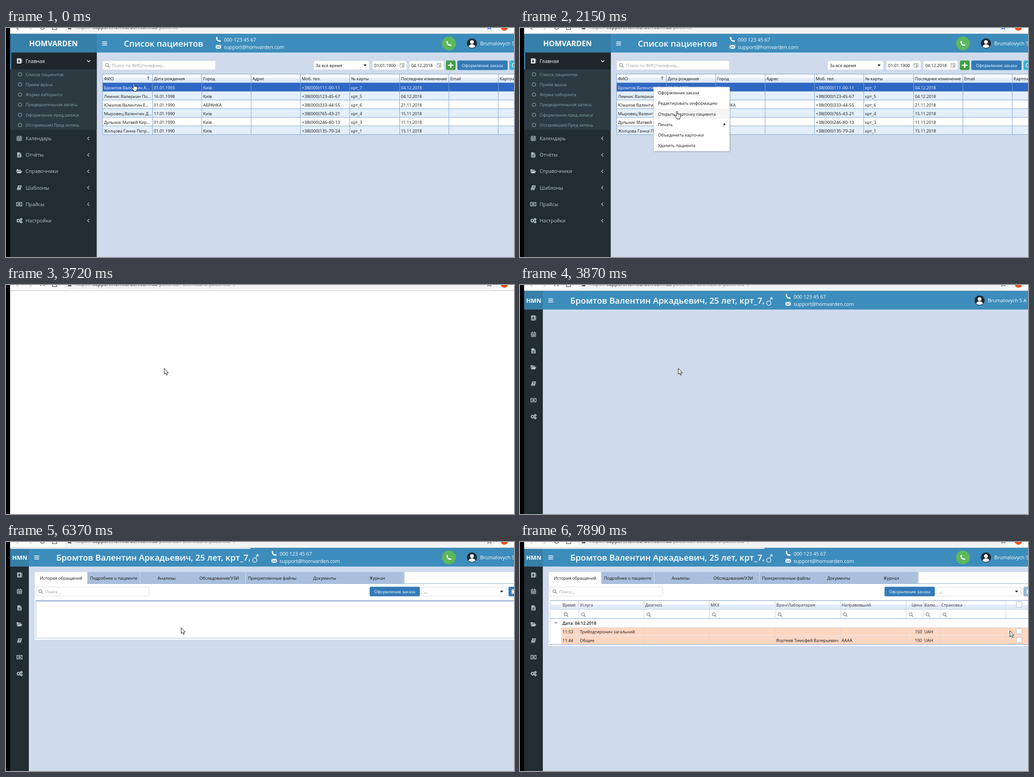
Animation of 1112x504 px, one loop 8 s. Source, as an HTML page:

```html
<!DOCTYPE html>
<html lang="ru">
<head>
<meta charset="utf-8">
<title>Список пациентов</title>
<style>
html, body { margin: 0; width: 100%; height: 100%; overflow: hidden; background: #000; }
svg { display: block; width: 1112px; height: 504px; font-family: 'Open Sans', 'Noto Sans', sans-serif; }
text { white-space: pre; }
</style>
</head>
<body>
<svg id="stage" viewBox="0 0 1112 504"></svg>
<script>
const LOOP = 8000;
const BRAND = 'HOMVARDEN', SHORT = 'HMN', PHONE = '000 123 45 67', MAIL = 'support@homvarden.com';
const USER = 'Brumalovych S A', PATIENT = 'Бромтов Валентин Аркадьевич';
const BLUE = '#337ab7', PAGE = '#cfdbec', GRID = '#7fa3cb';

// Drawing helpers
const rect = (x, y, w, h, fill, more = '') =>
  `<rect x="${x}" y="${y}" width="${w}" height="${h}" fill="${fill}" ${more}/>`;
const text = (x, y, s, size = 9.2, fill = '#111', more = '') =>
  `<text x="${x}" y="${y}" font-size="${size}" fill="${fill}" ${more}>${s}</text>`;
const path = (d, stroke, width = 1, more = '') =>
  `<path d="${d}" fill="none" stroke="${stroke}" stroke-width="${width}" ${more}/>`;
const disc = (x, y, r, fill, more = '') => `<circle cx="${x}" cy="${y}" r="${r}" fill="${fill}" ${more}/>`;
const hline = (x, y, w, fill) => rect(x, y, w, 1, fill);
const vline = (x, y, h, fill) => rect(x, y, 1, h, fill);
const put = (x, y, s) => `<g transform="translate(${x} ${y})">${s}</g>`;
const each = (list, f) => list.map(f).join('');
const field = (x, y, w, h = 20) => rect(x + .5, y + .5, w, h, '#fff', 'stroke="#d3dae3" rx="2"');
const caret = (x, y) => put(x, y, '<path d="M-3.5-1.7H3.5L0 2Z" fill="#111"/>');
const lens = (x, y) => put(x, y, path('M2 2L4.6 4.8', '#888', 1.5) + disc(-.8, -.8, 3.3, 'none', 'stroke="#888" stroke-width="1.2"'));
const SEMI = 'font-weight="600" ', BOLD = 'font-weight="700" ', MID = 'text-anchor="middle"', END = 'text-anchor="end"';

// Icons are centred on 0,0
const solid = d => c => `<path d="${d}" fill="${c}" fill-rule="evenodd"/>`;
const icons = {
  contacts: solid('M-5-5.5H4V5.5H-5ZM4.6-4H6V-1.8H4.6ZM4.6-1H6V1.2H4.6ZM4.6 2H6V4H4.6ZM-.5-3.2A1.8 1.8 0 0 0-.5.4 1.8 1.8 0 0 0-.5-3.2ZM-3.3 3H2.3Q2.2.8 1 .7H-2Q-3.2.8-3.3 3Z'),
  calendar: c => path('M-5-4H5V5H-5ZM-5-1.3H5M-5 1.8H5M-2.4-1.3V5M0-1.3V5M2.4-1.3V5', c) + path('M-2.5-6V-3M2.5-6V-3', c, 1.6),
  file: solid('M-4.5-5.5H1V-2H4.5V5.5H-4.5ZM1.7-5.5L4.5-2.7H1.7ZM-2.5-.5V.5H2.5V-.5ZM-2.5 1.4V2.3H2.5V1.4ZM-2.5 3.2V4.1H2.5V3.2Z'),
  folder: solid('M-6 3V-4.5H-2.5L-1.5-3.3H3.5V-1.5H-3ZM-5.6 4.3L-2.7-.7H6.4L3.6 4.3Z'),
  book: solid('M-2.5-5H5.5L2.8 4.8H-4.5Q-5.8 4.3-5.2 3ZM-1.3-3.2L-1.6-2.2H3.2L3.5-3.2ZM-2-1L-2.3 0H2.5L2.8-1ZM-4 2.8L-4.3 3.7H2L2.3 2.8Z'),
  money: c => rect(-5.8, -3.8, 11.6, 7.6, 'none', `stroke="${c}" stroke-width="1.3"`) + disc(0, 0, 2.5, c) +
    path('M0-1.5V1.5', '#222d32') + path('M-5-2.5H-3.6M5-2.5H3.6M-5 2.5H-3.6M5 2.5H3.6', c),
  cogs: c => each([[-2, 0, 2.6], [4, -3, 1.4], [4, 3, 1.4]], ([x, y, r]) =>
    disc(x, y, r, 'none', `stroke="${c}" stroke-width="1.6"`) +
    disc(x, y, r + 1.1, 'none', `stroke="${c}" stroke-width="1.2" stroke-dasharray="1.4 1.4"`)),
  phone: solid('M-5.5-4Q-4.6-5.8-3-5.5L-1.6-2.3-2.8-1Q-1.4 1.6 1 2.6L2.3 1.4 5.5 3Q5.5 4.7 4 5.5Q-5 5-5.5-4Z'),
  mail: solid('M-6-4.3H6L0 .4ZM-6-3.2L-2 .2-6 3.3ZM6-3.2L2 .2 6 3.3ZM-5.6 4.3L-1.3.9 0 1.9 1.3.9 5.6 4.3Z'),
  trash: solid('M-4-3.5H4V-2.3H-4ZM-1.5-5H1.5V-3.5H-1.5ZM-3.3-1.6H3.3V5H-3.3Z'),
  date: c => path('M-4.5-4H4.5V4.5H-4.5ZM-4.5-2H4.5', c) + rect(0, 0, 3, 3, c)
};
const icon = (name, x, y, c = '#b8c7ce') => put(x, y, icons[name](c));

// Stepwise tracks: [time, values...]; the last one reached holds
const at = (track, t) => track.findLast(k => k[0] <= t);
const HAND = [[0, 274, 122], [120, 278, 128], [270, 288, 130], [410, 289, 130], [1200, 290, 130],
  [1470, 292, 129], [1880, 319, 159], [2020, 333, 175], [2150, 338, 183]];
const ARROW = [[2570, 341, 183], [3290, 346, 183], [5960, 353, 183], [6090, 365, 184], [6240, 373, 186],
  [6370, 383, 188], [6510, 385, 212], [6640, 383, 225], [6780, 384, 227], [6930, 390, 227], [7060, 389, 226],
  [7340, 386, 226], [7480, 600, 250], [7610, 929, 253], [7760, 1030, 228], [7890, 1072, 195]];
const BAR = [[0, 9], [5300, 71], [5430, 97], [5570, 200], [5700, 285], [5820, 360], [5960, 425],
  [6090, 480], [6240, 515], [6370, 535]];
const TIP = [[0, 0], [410, .3], [535, .6], [660, .85], [800, 1], [1200, 0]];
const MENU = [[0, 0], [1200, 85], [1320, 132], [1470, 141]];

function toolbar(t) {
  const first = t < 2570, blank = t >= 2570 && t < 2720, loading = t >= 2720 && t < 5300;
  const grey = '#5f6368', span = (s, c) => `<tspan fill="${c}">${s}</tspan>`;
  const url = blank ? span('about:', '#777') + span('blank', '#222')
    : span('https://', '#777') + span('support.homvarden.com.ua', '#222') +
      span('/patients' + (first ? '' : '/PatientCard?patientId=7'), '#777');
  const lock = first || t >= 3720;
  return rect(9, 0, 1103, 13, '#fff') + rect(125, -12, 947, 21, '#f1f3f4', 'rx="10.5"') +
    path('M27-6L22-1 27 4', first ? grey : '#bbb', 1.5) + path('M52-6L57-1 52 4', '#bbb', 1.5) +
    (loading ? path('M75-7L84 2M84-7L75 2', grey, 1.5) : disc(80, -2, 4.8, 'none', `stroke="${grey}" stroke-width="1.5"`)) +
    path('M102-4V3.5H111V-4', grey, 1.5) +
    (lock ? rect(135.5, -4, 7.5, 7, grey) : disc(139.5, -1.5, 4.8, 'none', `stroke="${grey}" stroke-width="1.3"`)) +
    text(152, 2, url, 10.9) +
    put(1058, -2, `<path d="M0-6L1.7-2 6-1.7 2.7 1 3.8 5 0 2.8-3.8 5-2.7 1-6-1.7-1.7-2Z" fill="${first ? '#4285f4' : 'none'}" stroke="${first ? '#4285f4' : grey}"/>`) +
    disc(1091, -2, 8, '#f4511e') + hline(9, 12, 1103, '#b5b8bb');
}

function header(left, titleX, title, contactX, userX) {
  return rect(9, 13, 1103, 41, '#3c8dbc') + rect(9, 13, left - 9, 41, '#367fa9') +
    path(`M${left + 12} 30.5h10.5m-10.5 3.5h10.5m-10.5 3.5h10.5`, '#fff', 1.6) +
    text(titleX, 41.3, title, 18.5, '#fff', SEMI) +
    icon('phone', contactX - 12, 25, '#fff') + text(contactX, 29.7, PHONE, 10.9, '#fff') +
    icon('mail', contactX - 12, 41.5, '#fff') + text(contactX, 46, MAIL, 10.8, '#fff') +
    disc(userX, 34, 11, '#1f2a33') + disc(userX, 31, 4.2, '#fff') +
    `<path d="M${userX - 7.5} 41Q${userX - 6} 36 ${userX} 36T${userX + 7.5} 41Q${userX} 46.5 ${userX - 7.5} 41Z" fill="#fff"/>` +
    text(userX + 18, 38, USER, 10.9, '#fff');
}
const callButton = () => disc(969.5, 34, 15.2, '#5cb85c') + icon('phone', 969.5, 34, '#fff');
const button = (x, y, w, s) => rect(x, y, w, 21, BLUE, 'rx="3"') + text(x + w / 2, y + 14.3, s, 9.2, '#fff', MID);

const SECTIONS = ['contacts', 'calendar', 'file', 'folder', 'book', 'money', 'cogs'];
const LABELS = ['Календарь', 'Отчёты', 'Справочники', 'Шаблоны', 'Прайсы', 'Настройки'];
const LINKS = ['Список пациентов', 'Приём врача', 'Форма лаборанта', 'Предварительная запись',
  'Оформление пред.записи', '(Устаревшая) Пред запись'];
const COLUMNS = ['ФИО', 'Дата рождения', 'Город', 'Адрес', 'Моб. тел.', '№ карты', 'Последнее изменение', 'Email', 'Карточка'];
const PATIENTS = [
  ['Бромтов Валентин А...', '01.01.1993', 'Київ', '+38(000)111-00-11', 7, '04.12.2018'],
  ['Лемнис Валериан По...', '16.01.1998', 'Київ', '+38(000)123-45-67', 5, '04.12.2018'],
  ['Юмалов Валентин Е...', '01.01.1990', 'АБРАНКА', '+38(000)333-44-55', 6, '21.11.2018'],
  ['Мыровец Валентин Д...', '17.01.1990', 'Київ', '+38(000)765-43-21', 4, '15.11.2018'],
  ['Дульник Матвей Кир...', '01.01.1990', 'Київ', '+38(000)246-80-13', 3, '11.11.2018'],
  ['Жолцова Ганна Петр...', '01.01.1990', 'Київ', '+38(000)135-79-24', 1, '15.11.2018']
];
const ACTIONS = ['Оформление заказа', 'Редактировать информацию', 'Открыть карточку пациента', 'Печать',
  'Объединить карточки', 'Удалить пациента'];

function sidebar() {
  return rect(9, 54, 189.6, 450, '#222d32') + rect(9, 54, 189.6, 37, '#1e282c') + rect(9, 54, 2.5, 37, '#3c8dbc') +
    rect(9, 91, 189.6, 133, '#2c3b41') +
    icon('contacts', 29, 72.5, '#fff') + text(43, 76.5, 'Главная', 10.8, '#fff') + path('M177.5 71L181 74.5 184.5 71', '#fff', 1.4) +
    each(LINKS, (s, i) => disc(30.5, 102 + i * 22.3, 3.8, 'none', 'stroke="#8aa4af" stroke-width="1.3"') +
      text(43, 105.5 + i * 22.3, s, 9.2, '#8aa4af')) +
    each(LABELS, (s, i) => {
      const y = 243 + i * 36.2;
      return icon(SECTIONS[i + 1], 29, y) + text(43, y + 4, s, 10.8, '#b8c7ce') +
        put(180, y, path('M2-3.5L-1.5 0 2 3.5', '#b8c7ce', 1.4));
    });
}

function patientTable() {
  const colX = i => Math.floor(211.8 + i * 108.2);
  return rect(211, 101, 901, 19, 'url(#head)') + hline(211, 101, 901, GRID) +
    each(PATIENTS, (p, i) => {
      const y = 120 + i * 19, c = i ? '#111' : '#fff';
      const cell = (col, s, size) => text(colX(col) + 3.5, y + 14.5, s, size, c);
      return rect(211, y, 901, 19, i ? (i % 2 ? '#e3effc' : '#fff') : '#2f68c3') + hline(211, y, 901, GRID) +
        cell(0, p[0]) + cell(1, p[1], 9) + cell(2, p[2]) + cell(4, p[3], 9.7) + cell(5, 'крт_' + p[4]) + cell(6, p[5], 9);
    }) +
    hline(211, 234, 901, GRID) +
    each(COLUMNS, (s, i) => vline(colX(i), 101, 134, GRID) + text(colX(i) + 3.5, 114.8, s)) +
    path('M311.5 114V107M309 109.5L311.5 107 314 109.5', '#333');
}

function contextMenu(t) {
  const h = at(MENU, t)[1], pitch = 23.1;
  if (!h) return '';
  const hover = Math.floor((at(HAND, t)[2] - 131) / pitch);
  return rect(292.5, 130, 166.5, h, '#fff', 'stroke="#c6c9cd" filter="url(#shadow)"') +
    (hover > 0 ? rect(293, 131 + hover * pitch, 165.5, pitch, '#f5f5f5') : '') +
    each(ACTIONS, (s, i) => 16 + i * pitch < h ? text(302, 146.3 + i * pitch, s) : '') +
    (h > 85 ? '<path d="M446 209L450 212 446 215Z" fill="#111"/>' : '');
}

function listScene(t) {
  const tip = at(TIP, t)[1];
  return header(198.6, 258, 'Список пациентов', 477, 1020) + text(104, 39.5, BRAND, 16.2, '#fff', BOLD + MID) +
    callButton() + sidebar() +
    field(211, 71.5, 247) + lens(222, 82) + text(232, 85.8, 'Поиск по ФИО/телефону...', 9.2, '#999') +
    field(673, 71.5, 122) + text(678, 85.8, 'За всё время') + caret(786, 82) +
    each([[801, '01.01.1900'], [882, '04.12.2018']], ([x, s]) =>
      field(x, 71.5, 76) + text(x + 5, 85.8, s, 9.2) + icon('date', x + 66, 82, '#999')) +
    rect(963, 71.5, 21, 21, '#43a047', 'rx="3"') + path('M967.5 82H979.5M973.5 76V88', '#fff', 2.6) +
    button(988, 71.5, 110, 'Оформление заказа') +
    rect(1102, 71.5, 20, 21, '#3bb3d8', 'rx="3"') + disc(1112, 82, 4, 'none', 'stroke="#fff" stroke-width="1.5"') +
    patientTable() + contextMenu(t) +
    (tip ? `<g opacity="${tip}">${rect(292.5, 149.5, 153, 15, '#fff', 'stroke="#8a8a8a" filter="url(#shadow)"')}${text(297, 160.5, PATIENT, 9.2, '#555')}</g>` : '');
}

const TABS = ['История обращений', 'Подробнее о пациенте', 'Анализы', 'Обследования/УЗИ', 'Прикрепленные файлы', 'Документы', 'Журнал'];
const VISIT_X = [65, 128, 271, 414, 558, 701, 845, 882, 919, 1063];
const VISIT_HEADS = ['Время', 'Услуга', 'Диагноз', 'МКХ', 'Врач/Лаборатория', 'Направивший', 'Цена', 'Валю...', 'Страховка'];
const VISITS = [
  ['11:53', 'Трийодтиронин загальний', '', '', 150],
  ['11:44', 'Общие', 'Вортеев Тимофей Валерьевич', 'АААА', 100]
];

function visitTable() {
  const light = '#c5d5e8', box = y => rect(1086.5, y + .5, 12, 12, '#fff', 'stroke="#9fb2c8" rx="2"');
  return rect(65, 128, 1047, 21, 'url(#head)') + rect(65, 128, 1047, 1.5, '#9db4d3') + hline(65, 148, 1047, light) +
    each(VISIT_HEADS, (s, i) => i === 6 ? text(880, 142.3, s, 9.2, '#333', END) : text(i ? VISIT_X[i] + 3 : 93, 142.3, s, 9.2, '#333')) +
    each(VISIT_X.slice(0, 9), (x, i) => lens(i ? x + 11 : 101, 160)) +
    hline(65, 168, 1047, GRID) + '<path d="M75 176.5H82L78.5 180Z" fill="#888"/>' +
    text(93, 182, 'Дата: 04.12.2018', 9.2, '#111', SEMI) +
    each(VISITS, ([time, name, doctor, sender, price], i) => {
      const y = 188 + i * 19, b = y + 13.4;
      return rect(90, y, 1022, 18.5, '#ffd7c1') + hline(90, y, 1022, '#d9d3d8') + text(93, b, time) + text(131, b, name) +
        text(561, b, doctor) + text(704, b, sender) + text(880, b, price, 9.2, '#111', END) + text(885, b, 'UAH') + box(y + 2);
    }) +
    each(VISIT_X, (x, i) => vline(x, 129, i ? 40 : 98, light) + (i ? vline(x, 188, 37, '#d9d3d8') : '')) +
    box(131) + hline(65, 225, 1047, GRID);
}

function visitPanel(ready) {
  const shift = ready ? 2 : 0, tabX = i => Math.round(63 + i * 115.4);
  return rect(63, 66, 1049, ready ? 163 : 149, '#fff') +
    each(TABS, (s, i) => (i ? rect(tabX(i), 66, 115.4, 25, '#a9bfdc') : '') +
      vline(tabX(i + 1), 66, 25, '#809cbf') + text(tabX(i) + 57.7, 82.7, s, 9.2, '#111', MID)) +
    hline(178, 91, 934, '#8fa9c9') +
    field(65, 98.5, 247) + lens(76, 109) + text(86, 112.8, 'Поиск...', 9.2, '#999') +
    button(796 + shift, 98.5, 110, 'Оформление заказа') +
    field(910 + shift, 98.5, 184) + text(915 + shift, 112.8, '...') + caret(1085 + shift, 109) +
    rect(1100 + shift, 98.5, 20, 21, ready ? '#94b8d9' : BLUE, 'rx="3"') + icon('trash', 1110 + shift, 109, '#fff') +
    (ready ? visitTable() : rect(65.5, 128.5, 1060, 83, '#fff', 'stroke="#a9b9cf"') + rect(65, 128, 1047, 3, '#a7bad6'));
}

function cardScene(t) {
  const open = t >= 5300, bar = at(BAR, t)[1];
  return header(50, 110, PATIENT + ', 25 лет, крт_7,', 599, open ? 1020 : 1006) +
    text(30, 39, SHORT, 13.2, '#fff', BOLD + MID) +
    disc(544.5, 40, 4.8, 'none', 'stroke="#fff" stroke-width="1.3"') + path('M546.5 35.5L551.5 27.5M547 29L551.5 27.5 552.5 32', '#fff', 1.3) +
    rect(9, 54, 41, 450, '#222d32') + each(SECTIONS, (s, i) => icon(s, 29.5, 72.5 + i * 36.2)) +
    (open ? callButton() + visitPanel(t >= 6930) + rect(9, 13, bar - 9, 2, '#fff') : '');
}

const DEFS = `<defs><linearGradient id="head" x2="0" y2="1"><stop offset=".4" stop-color="#fdfeff"/><stop offset=".5" stop-color="#e6eef9"/>
  <stop offset="1" stop-color="#dbe7f6"/></linearGradient>
  <filter id="shadow"><feDropShadow dx="1" dy="1" stdDeviation="1" flood-opacity=".25"/></filter></defs>`;

function cursor(t) {
  const [, x, y] = at(t < 2570 ? HAND : ARROW, t);
  const d = t < 2570
    ? 'M4.5 10V1.8Q4.5.5 5.7.5T7 1.8V6.5Q10 6.1 12.8 7.8 13.7 8.4 13.5 10 13.4 13 11.8 15V17.5H5.5V15.5L1 11Q.1 9.4 1.5 9.2 2.7 9.2 4.5 11Z'
    : 'M.5.5V13.5L3.4 10.9 5.4 15.5 7.4 14.6 5.4 10.2H9.4Z';
  return put(x, y, `<path d="${d}" fill="#fff" stroke="#000" stroke-width=".9"/>`);
}

const stage = document.getElementById('stage');
let shown = '';
function draw() {
  const t = performance.now() % LOOP;
  const page = t < 2570 ? listScene(t) : t < 3870 ? '' : cardScene(t);
  const frame = DEFS + rect(0, 0, 1112, 504, page ? PAGE : '#fefefe') + toolbar(t) + page + rect(0, 0, 9, 504, '#000') + cursor(t);
  if (frame !== shown) stage.innerHTML = shown = frame;
  requestAnimationFrame(draw);
}
draw();
</script>
</body>
</html>
```
